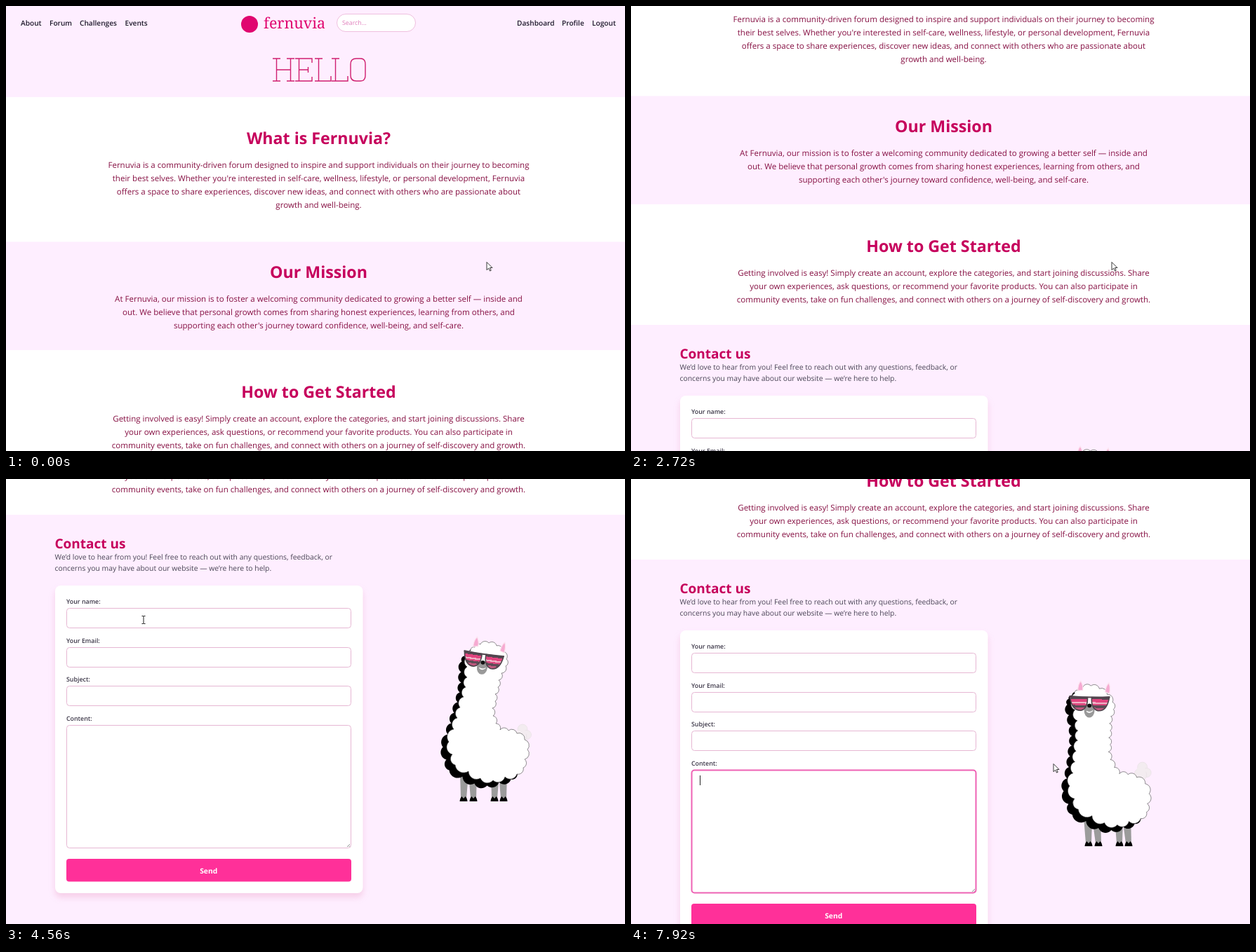
Animation, 882 px wide and 635 px high, one loop 8 s. Source, as an HTML page:

```html
<!DOCTYPE html>
<html lang="en">
<head>
<meta charset="utf-8">
<title>Fernuvia</title>
<style>
  html, body { margin: 0; width: 100%; height: 100%; overflow: hidden; background: #fff; }
  svg { display: block; width: 882px; height: 635px; }
  text { font-family: "Open Sans", "Noto Sans", sans-serif; text-rendering: geometricPrecision; white-space: pre; }
  .nav { font-size: 10.15px; font-weight: 600; fill: #1e1a2b; }
  .brand { font: 500 21.4px "Noto Serif", serif; fill: #e0066f; }
  .hint { font-size: 8.8px; fill: #e07dbb; }
  .title { font-size: 23.2px; font-weight: 700; fill: #c6005c; text-anchor: middle; }
  .body { font-size: 11.56px; fill: #861043; text-anchor: middle; }
  .contact { font-size: 19px; font-weight: 700; fill: #c6005c; }
  .note { font-size: 10.36px; fill: #4a4556; }
  .label { font-size: 8.85px; font-weight: 600; fill: #3b3647; }
  .send { font-size: 10.3px; font-weight: 700; fill: #fff; text-anchor: middle; }
  .menu { font-size: 8.3px; fill: #d9d6de; }
  .band { fill: #feeeff; }
  .card { fill: #fff; filter: drop-shadow(0 6px 4px rgba(225, 120, 165, .26)); }
  .field { fill: #fff; stroke: #e6b7d3; }
  .field.on { stroke: #ee62b4; stroke-width: 2; }
</style>
</head>
<body>
<svg viewBox="0 0 882 635">
  <defs>
    <linearGradient id="lens" x2="0" y2="1" id-units="objectBoundingBox">
      <stop offset=".14" stop-color="#574852"/><stop offset=".14" stop-color="#e2447f"/>
      <stop offset=".36" stop-color="#e2447f"/><stop offset=".36" stop-color="#efb3c6"/>
      <stop offset=".48" stop-color="#efb3c6"/><stop offset=".48" stop-color="#dc4a80"/>
      <stop offset=".6" stop-color="#dc4a80"/><stop offset=".6" stop-color="#5d4c56"/>
      <stop offset=".78" stop-color="#5d4c56"/><stop offset=".78" stop-color="#c0587f"/>
    </linearGradient>
  </defs>

  <g id="page">
    <path class="band" d="M0 0H882V130H0zM0 336.5H882V491H0zM0 663H882V1250H0z"/>
    <g id="copy"></g>
    <circle cx="347" cy="26" r="12" fill="#e0066f"/>
    <rect x="471.5" y="11.5" width="112" height="25" rx="12.5" fill="#fff" stroke="#efbfdf"/>
    <text class="hint" x="479" y="27">Search...</text>
    <path fill="none" stroke="#cf1f70" stroke-width="1.4" d="M380 75h11M385.5 75v32M380 107h11M400 75h11M405.500 75v32M400 107h11M385.500 91h20
      M412 75h24v6M417.500 75v32M412 107h24v-6M417.500 91h13M430.500 87v8
      M440 75h11M445.500 75v32M440 107h23v-7M464 75h11M469.500 75v32M464 107h23v-7
      M499 75h6q7 0 7 8v16q0 8 -7 8h-6q-8 0 -8 -8v-16q0 -8 8 -8z"/>

    <rect class="card" x="70" y="764" width="438.500" height="439" rx="8"/>
    <g id="form"></g>
    <path d="M486 1137l4-4M488.500 1137l1.500-1.500" stroke="#777" stroke-width=".8"/>
    <rect x="86" y="1154" width="406" height="32.500" rx="4" fill="#ff3099"/>
    <text class="send" x="288.700" y="1174.500">Send</text>

    <g transform="translate(0 612)">
      <g id="tail" fill="#f3ecf0" stroke="#e6dde2" stroke-width=".6">
        <circle cx="736" cy="357" r="7"/><circle cx="742" cy="365" r="6.500"/>
        <circle cx="733" cy="368" r="9"/><circle cx="734" cy="363" r="7" stroke="none"/>
      </g>
      <g id="legs"></g>
      <path id="shade" fill="#000"/>
      <path id="wool" fill="#fff" stroke="#333" stroke-width=".55"/>
      <g id="head">
        <g id="ears" fill="#f6aad2" stroke="#fbe3ef" stroke-width="1.200">
          <path d="M-17 -17Q-17 -27 -13 -31Q-9 -24 -10 -18z"/>
          <path d="M22 -16Q23 -25 27 -29Q30 -22 28 -14z"/>
        </g>
        <ellipse cx="0" cy="11" rx="7.500" ry="10" fill="#999"/>
        <path d="M-4 12Q0 16 5 11Q2 14.500 -4 12z" fill="#fff" stroke="#fff"/>
        <g id="glasses" fill="url(#lens)" stroke="#50454d" stroke-width="1.600">
          <path d="M-28 -8H-3Q-2 8 -12 11Q-25 12 -28 -8z"/>
          <path d="M28 -8H3Q2 8 12 11Q25 12 28 -8z"/>
          <path d="M-29 -9Q0 -7 29 -9" fill="none" stroke-width="2"/>
        </g>
        <ellipse cx="0" cy="4" rx="3" ry="2.700" fill="#111"/>
      </g>
    </g>
    <path id="caret" stroke="#222"/>
  </g>

  <g id="popup">
    <path d="M161 219.500L167 213L173 219.500z" fill="#120a1e"/>
    <rect x="153" y="219" width="118" height="60.500" rx="4" fill="#120a1e" style="filter:drop-shadow(0 1px 2px rgba(0,0,0,.4))"/>
    <path d="M153 249.500H271" stroke="#55505e"/>
    <g fill="none" stroke="#d9d6de">
      <circle cx="168" cy="234" r="4.300"/><circle cx="168" cy="232.800" r="1.200"/>
      <path d="M165.200 236.800Q168 234.500 170.800 236.800"/>
    </g>
    <circle cx="168" cy="264.500" r="4.600" fill="#cfccd4"/>
    <text class="menu" x="183" y="237.200" style="font-weight:700;fill:#fff">Zorelda Mineva</text>
    <text class="menu" x="183" y="267.700">Manage addresses...</text>
  </g>
  <path id="arrow" d="M0 0V11.200L2.700 8.700L4.500 12.600L6.200 11.800L4.500 8H8z" fill="#fff" stroke="#222" stroke-width=".9"/>
  <path id="beam" d="M-2.500 -5.500H-.8L0 -5L.8 -5.500H2.500M0 -5V5M-2.500 5.500H-.8L0 5L.8 5.500H2.500" fill="none" stroke="#222"/>
</svg>
<script>
const LOOP = 8000, STEP = 80, GROUND = 460;
const $ = id => document.getElementById(id);
const show = (id, on) => $(id).style.display = on ? '' : 'none';
const move = (id, x, y, more = '') => $(id).setAttribute('transform', `translate(${x} ${y})${more}`);
const text = (cls, x, y, s) => `<text class="${cls}" x="${x}" y="${y}">${s}</text>`;

const sections = [
  [197, 'What is Fernuvia?',
    'Fernuvia is a community-driven forum designed to inspire and support individuals on their journey to becoming',
    "their best selves. Whether you're interested in self-care, wellness, lifestyle, or personal development, Fernuvia",
    'offers a space to share experiences, discover new ideas, and connect with others who are passionate about',
    'growth and well-being.'],
  [387.5, 'Our Mission',
    'At Fernuvia, our mission is to foster a welcoming community dedicated to growing a better self — inside and',
    'out. We believe that personal growth comes from sharing honest experiences, learning from others, and',
    "supporting each other's journey toward confidence, well-being, and self-care."],
  [559, 'How to Get Started',
    'Getting involved is easy! Simply create an account, explore the categories, and start joining discussions. Share',
    'your own experiences, ask questions, or recommend your favorite products. You can also participate in',
    'community events, take on fun challenges, and connect with others on a journey of self-discovery and growth.']
];
const nav = { About: 21, Forum: 62, Challenges: 105, Events: 169.5, Dashboard: 728, Profile: 792, Logout: 835 };

$('copy').innerHTML =
  Object.entries(nav).map(([s, x]) => text('nav', x, 27.7, s)).join('') +
  text('brand', 367, 31.5, 'fernuvia') +
  sections.map(([y, title, ...lines]) => text('title', 445.5, y, title) +
    lines.map((s, i) => text('body', 445.5, y + 34 + i * 19, s)).join('')).join('') +
  text('contact', 69.5, 710.5, 'Contact us') +
  text('note', 69.5, 727, 'We’d love to hear from you! Feel free to reach out with any questions, feedback, or') +
  text('note', 69.5, 743.3, 'concerns you may have about our website — we’re here to help.');

const fields = ['Your name:', 'Your Email:', 'Subject:', 'Content:'].map((label, i) =>
  ({ label, y: 796.5 + Math.round(i * 55.7), h: i < 3 ? 28 : 175 }));
$('form').innerHTML = fields.map((f, i) => text('label', 86, f.y - 6.3, f.label) +
  `<rect id="field${i}" class="field" x="86.5" y="${f.y}" width="405" height="${f.h}" rx="4"/>`).join('');

// Linear interpolation through rows of [time, ...values].
function at(keys, t) {
  let i = keys.findIndex(k => k[0] > t);
  if (i < 0) return keys[keys.length - 1].slice(1);
  if (i === 0) return keys[0].slice(1);
  const a = keys[i - 1], b = keys[i], p = (t - a[0]) / (b[0] - a[0]);
  return a.slice(1).map((v, j) => v + (b[j + 1] - v) * p);
}

const scroll = [[1600, 0], [2160, 68], [3200, 328], [4160, 612], [7600, 612], [7920, 548], [8000, 526]];
const pointer = [[3680, 685, 365.5], [4400, 196, 201], [5000, 196, 201], [5300, 190.5, 200], [6080, 190.5, 200],
  [6480, 398, 420], [7040, 398, 420], [7520, 602, 406.5]];
const sway = [[0, -4.7], [3200, 0], [4560, 2], [5840, 4], [6880, 5.5], [7920, 7.29], [8000, 7.43]];
const focus = [[0, -1], [5360, 0], [6640, 3]];

const outline = [[668, 240], [676, 236], [688, 234], [699, 238], [708, 246], [713, 257], [712, 267], [706, 277], [702, 287],
  [701, 297], [697, 307], [697, 317], [693, 327], [694, 338], [698, 349], [704, 358], [716, 359], [728, 363], [739, 372],
  [743, 386], [739, 400], [737, 412], [728, 421], [711, 425], [694, 430], [676, 427], [659, 417], [640, 408], [636, 393],
  [631, 375], [638, 357], [643, 341], [647, 326], [652, 311], [655, 297], [657, 283], [657, 268], [658, 253], [662, 245]];

// Leaning grows with height above the ground.
function bend([x, y], lean) {
  const h = GROUND - y;
  return [x + lean * (h * .04 + h * h * .00085), y + lean * h * .02];
}

function fluff(lean, dx, dy) {
  const pts = outline.map(p => bend(p, lean)).map(([x, y]) => [x + dx, y + dy]);
  return pts.reduce((d, [x, y], i) => {
    const [px, py] = pts.at(i - 1), r = Math.hypot(x - px, y - py) * .58;
    return d + `A${r.toFixed(1)} ${r.toFixed(1)} 0 0 1 ${x.toFixed(1)} ${y.toFixed(1)}`;
  }, 'M' + pts.at(-1)) + 'z';
}

function llama(lean) {
  $('shade').setAttribute('d', fluff(lean, -8.5, 7.5));
  $('wool').setAttribute('d', fluff(lean, 0, 0));
  const [hx, hy] = bend([680, 258], lean);
  move('head', hx, hy, ` rotate(${8 + 11 * lean})`);
  const [tx, ty] = bend([735, 364], lean);
  move('tail', tx - 735, ty - 364 + lean * 14);
  const top = bend([0, 420], lean)[0];
  $('legs').innerHTML = [[652, -1], [666, 1], [696, -1], [709, 1]].map(([x, side]) => {
    const u = x + top - side;
    return `<path fill="#9b9b9b" d="M${u - 6} 420H${u + 6}L${x + 4} 456H${x - 4}z"/>
      <path d="M${x - 5.5} 460Q${x - 5} 455 ${x - 2.5} 453L${x} 456L${x + 2.5} 453Q${x + 5} 455 ${x + 5.5} 460z"/>`;
  }).join('');
}

function draw(t) {
  const y = Math.round(at(scroll, t)[0]);
  move('page', 0, -y);
  llama((Math.cos(at(sway, t)[0] * 2 * Math.PI) - 1) / 2);

  const [since, active] = focus.filter(f => f[0] <= t).pop();
  fields.forEach((f, i) => $('field' + i).classList.toggle('on', i === active));
  show('popup', active === 0);
  show('caret', active >= 0 && (t - since) % 1060 < 530);
  if (active >= 0) $('caret').setAttribute('d', `M98.5 ${fields[active].y + 7.5}v14`);

  const [px, py] = at(pointer, t);
  const typing = px > 86 && px < 492 && fields.some(f => py + y > f.y && py + y < f.y + f.h);
  show('beam', typing);
  show('arrow', !typing);
  move(typing ? 'beam' : 'arrow', px, py);
}

function tick() {
  const t = performance.now() % LOOP;
  draw(t - t % STEP);
  requestAnimationFrame(tick);
}
tick();
</script>
</body>
</html>
```
